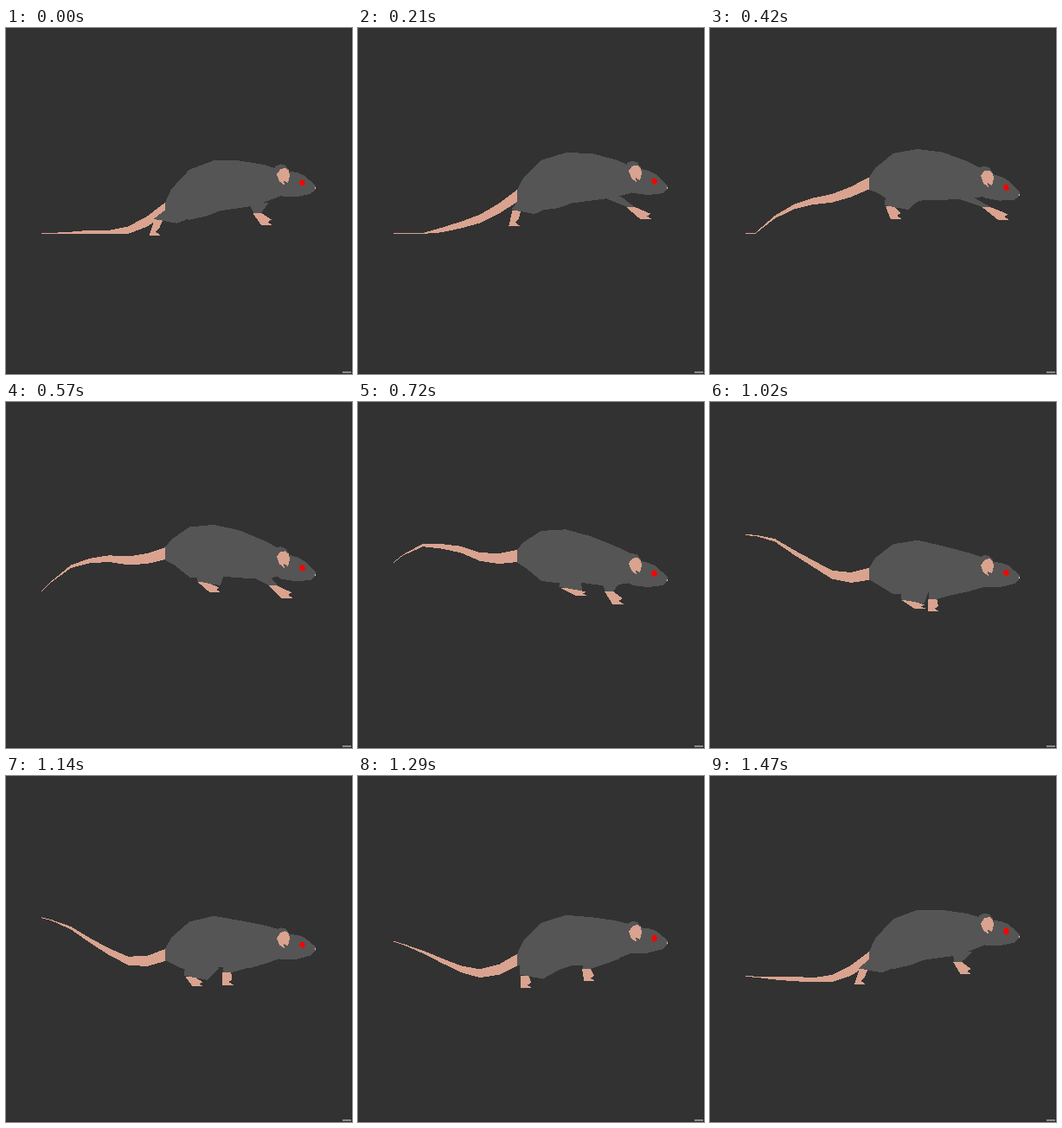
Recreate the animation shown at these times as an HTML page. Size 400 by 400 pixels, loop 1500 ms.

```html
<!DOCTYPE html>
<html lang="en">
<head>
<meta charset="utf-8">
<title>Running rat</title>
<style>
  html, body { margin: 0; width: 100%; height: 100%; overflow: hidden; background: #323232; }
  svg { display: block; width: 100vw; height: 100vh; shape-rendering: crispEdges; }
  .skin { fill: #d9a38f; }
  .fur { fill: #555; }
  .eye { fill: #f00; }
  .nose { fill: #d8cfca; }
</style>
</head>
<body>
<svg viewBox="0 0 400 400">
  <path d="M0 398.5H399V0H400V400H0z" fill="#2b2b2b"/>
  <rect x="389" y="397" width="10" height="2" fill="#8c8c8c"/>
  <polygon id="tail" class="skin"/>
  <polygon id="hindPaw" class="skin"/>
  <polygon id="forePaw" class="skin"/>
  <polygon id="hindLeg" class="fur"/>
  <polygon id="foreLeg" class="fur"/>
  <polygon id="torso" class="fur"/>
  <g id="head">
    <polygon class="fur" points="308,162 337,166 345,169 358,180 358,184 352,190 335,194 318,194 304,188"/>
    <polygon class="fur" points="309,167 311,160 317,157 323,158 327,163 320,172"/>
    <polygon class="skin" points="313,169 317,163 323,161 327,164 328,170 326,178 321,176 322,181 316,177"/>
    <polygon class="eye" points="339,177 341,174 345,174 346,178 344,181 340,180"/>
    <rect class="nose" x="357" y="182" width="1" height="2"/>
  </g>
</svg>
<script>
const LOOP = 1500, STEP = 30, GROUND = 237;

// Outline points: x, middle height, swing
const TAIL = [[41, 208, 55], [52, 204, 52], [75, 198, 46], [97, 198, 38],
  [119, 200, 34], [141, 202, 28], [163, 197, 23], [184, 187, 19]];
const BACK = [[184, 187, 19], [191, 175, 16], [212, 157, 13], [240, 151, 11],
  [269, 155, 12], [298, 163, 11], [316, 170, 10]];
const BELLY = [[318, 202, 12], [299, 207, 12], [281, 210, 13], [247, 210, 11],
  [232, 214, 11], [212, 215, 13], [194, 205, 17], [184, 201, 18]];

const el = id => document.getElementById(id);
const shape = (id, points) => el(id).setAttribute('points', points.join(' '));

function draw(p) {
  // p is the phase 0..1, peak the phase of the lowest (or rightmost) position
  const wave = (mid, swing, peak) => mid + swing * Math.cos(2 * Math.PI * (p - peak));

  // One wave runs through the whole body from head to tail tip
  const flex = ([x, mid, swing]) => [x, wave(mid, swing, 0.89 - 0.0019 * (x - 184))];

  const upper = TAIL.map(flex).map(([x, y]) => [x, Math.min(y, GROUND)]);
  const lower = upper.map(([x, y]) =>
    [x, Math.min(y + Math.max(1, (x - 41) / 10.2), GROUND + 1)]);
  shape('tail', [...upper, ...lower.reverse()]);
  shape('torso', [...BACK, ...BELLY].map(flex));

  const paw = (id, [x, y], dx, dy) => shape(id, [
    [x - 5, y], [x + dx - 6.5, y + dy], [x + dx + 6.5, y + dy],
    [x + dx + 1, y + dy * 0.75], [x + dx + 5, y + dy * 0.55], [x + 5, y]
  ]);

  const ankle = [wave(208, 32, 0.53), wave(219, 13, 0.785)];
  const [ax, ay] = ankle;
  paw('hindPaw', ankle, wave(8, 13, 0.54), wave(13.5, 5, 0.07));
  shape('hindLeg', [
    [Math.max(186, ax - 5), ay - 13], [ax - 6, ay - 1],
    [ax + 21, ay + 4], [245 + 0.4 * (ax - 208), ay - 10]
  ]);

  const wrist = [wave(288, 33, 0.24), wave(217, 11, 0.7)];
  const [wx, wy] = wrist;
  paw('forePaw', wrist, wave(10.5, 9.5, 0.23), 14.5);
  shape('foreLeg', [
    [Math.min(281, wx - 4), wy - 12], [wx - 4, wy], [wx + 5, wy], [304, wy - 12]
  ]);

  const drop = Math.min(20, wave(10, 13, 0.62));
  const tilt = wave(3, 4, 0.3) / 40;
  el('head').setAttribute('transform', `matrix(1 ${tilt} 0 1 0 ${drop - tilt * 320})`);
}

function tick() {
  draw(Math.floor(performance.now() % LOOP / STEP) * STEP / LOOP);
  requestAnimationFrame(tick);
}
tick();
</script>
</body>
</html>
```
